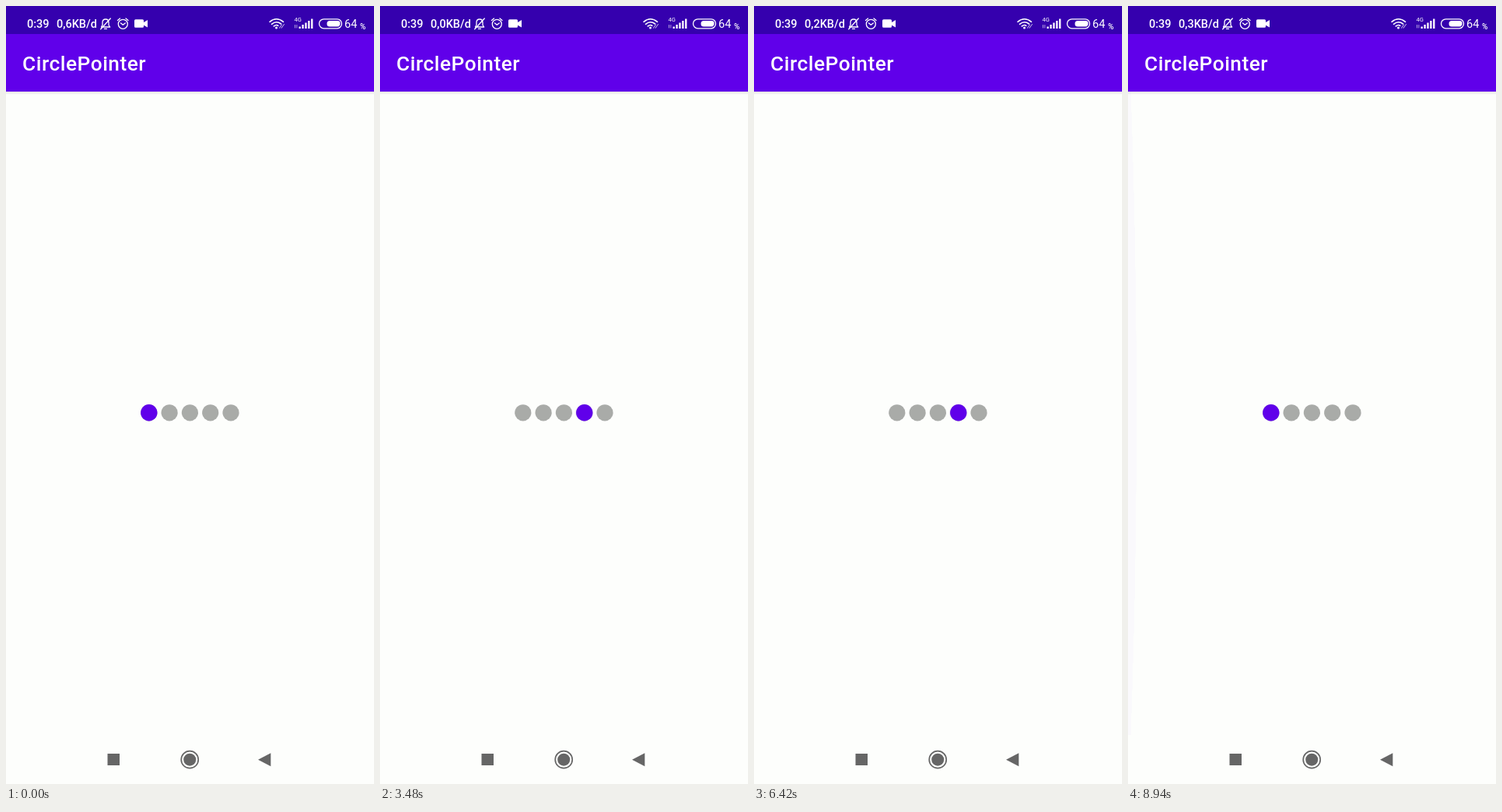
Animation, 473 px wide and 1000 px high, one loop 9 s. Source, as an HTML page:

```html
<!DOCTYPE html>
<html lang="en">
<head>
<meta charset="utf-8">
<title>Pager dots</title>
<style>
  html, body { margin: 0; width: 100%; height: 100%; overflow: hidden; background: #fdfefc; }
  svg { display: block; width: 100%; height: 100%; }
  text { font-family: Roboto, sans-serif; fill: #fff; }
  .status { font-size: 14.5px; font-weight: 500; }
  .title { font-size: 26.3px; font-weight: 500; letter-spacing: .5px; }
  .line { fill: none; stroke: #fff; stroke-width: 1.3; stroke-linecap: round; stroke-linejoin: round; }
  .bold { stroke-width: 1.6; }
  .thin { stroke-width: .8; }
  .fill { fill: #fff; }
  .nav { fill: #666; }

  .current { animation: page 9s step-end infinite; }
  @keyframes page {
    0% { transform: translateX(0); }
    11.1% { transform: translateX(26.3px); }
    21.7% { transform: translateX(52.6px); }
    32.3% { transform: translateX(78.9px); }
    43.3% { transform: translateX(105.2px); }
    65.5% { transform: translateX(78.9px); }
    73.3% { transform: translateX(52.6px); }
    80% { transform: translateX(26.3px); }
    87.2%, 100% { transform: translateX(0); }
  }

  .rate text { visibility: hidden; animation: 9s step-end infinite; }
  .rate :nth-child(1) { animation-name: rate1; }
  .rate :nth-child(2) { animation-name: rate2; }
  .rate :nth-child(3) { animation-name: rate3; }
  .rate :nth-child(4) { animation-name: rate4; }
  @keyframes rate1 { 0% { visibility: visible; } 11.1%, 100% { visibility: hidden; } }
  @keyframes rate2 { 0% { visibility: hidden; } 11.1% { visibility: visible; } 44.4%, 100% { visibility: hidden; } }
  @keyframes rate3 { 0% { visibility: hidden; } 44.4% { visibility: visible; } 77.8%, 100% { visibility: hidden; } }
  @keyframes rate4 { 0% { visibility: hidden; } 77.8%, 100% { visibility: visible; } }

  /* Overscroll glow: a wide circle squashed against the page edge */
  .glow { fill: #6200ee; opacity: 0; transform-box: view-box; }
  .right { transform-origin: 473px 523px; animation: pull-right 9s infinite; }
  .left { transform-origin: 0 523px; animation: pull-left 9s infinite; }
  @keyframes pull-right {
    0%, 54.3% { transform: scaleX(0); opacity: 0; animation-timing-function: ease-out; }
    56.6%, 57% { transform: scaleX(.42); opacity: .09; animation-timing-function: cubic-bezier(.333, .667, .667, 1); }
    63.7%, 100% { transform: scaleX(0); opacity: 0; }
  }
  @keyframes pull-left {
    0%, 93.5% { transform: scaleX(0); opacity: 0; animation-timing-function: ease-out; }
    96% { transform: scaleX(.42); opacity: .09; animation-timing-function: cubic-bezier(.333, .476, .667, .81); }
    100% { transform: scaleX(.067); opacity: .014; }
  }
</style>
</head>
<body>
<svg viewBox="0 0 473 1000" preserveAspectRatio="none">
  <defs>
    <clipPath id="content"><rect y="110" width="473" height="827"/></clipPath>
    <linearGradient id="shadow" x2="0" y2="1">
      <stop stop-opacity=".1"/>
      <stop offset="1" stop-opacity="0"/>
    </linearGradient>
  </defs>

  <rect width="473" height="1000" fill="#fdfefc"/>
  <g clip-path="url(#content)">
    <circle class="glow right" cx="1608" cy="523" r="1240"/>
    <circle class="glow left" cx="-1135" cy="523" r="1240"/>
  </g>

  <rect y="110" width="473" height="4" fill="url(#shadow)"/>
  <rect y="36" width="473" height="74" fill="#6000ea"/>
  <rect width="473" height="36" fill="#3500ae"/>
  <text class="title" x="21" y="83">CirclePointer</text>

  <g class="status">
    <text x="27" y="27.700">0:39</text>
    <g class="rate">
      <text x="65" y="27.700">0,6KB/d</text>
      <text x="65" y="27.700">0,0KB/d</text>
      <text x="65" y="27.700">0,2KB/d</text>
      <text x="65" y="27.700">0,3KB/d</text>
    </g>
    <text x="435" y="27.700" font-weight="400">64</text>
    <text x="455" y="30" font-size="10">%</text>
  </g>

  <!-- muted bell, alarm, camera -->
  <path class="line" d="M122.500 27H133.700L132 24.500V21.300C132 18.500 130.500 17 128 17S124 18.500 124 21.300V24.500ZM126.500 29.300H129.500M121.700 29.800L134.300 16"/>
  <g class="line">
    <circle cx="150.300" cy="23.300" r="6"/>
    <path d="M147.500 22L150.300 24.300L153.300 22M143.500 18.500L146.500 16M157 18.500L154 16"/>
  </g>
  <path class="fill" d="M166.500 17.300H175.500Q177 17.300 177 18.800V21L182 18V27.500L177 24.800V26.300Q177 27.800 175.500 27.800H166.500Q165 27.800 165 26.300V18.800Q165 17.300 166.500 17.300Z"/>

  <!-- wifi -->
  <path class="line bold" d="M339 20.300Q347.500 13.300 356.500 20.300M341.500 23.300Q347.500 18.300 353.500 23M344.300 26Q347.500 23.500 349.800 25.300"/>
  <path class="line thin" d="M351.500 28.300L354.500 24M354 28.300L357.500 23.500"/>
  <circle class="fill" cx="347.500" cy="28" r="1.500"/>

  <!-- mobile signal -->
  <text x="370.500" y="20" font-size="7.500">4G</text>
  <path class="line thin" d="M371.500 28V24.500M373.800 24.500V28" opacity=".8"/>
  <path class="fill" d="M376.500 26.500h2.300v2.500h-2.300zM380.400 24h2.300v5h-2.300zM384.300 21.500h2.300v7.500h-2.300zM388.200 19h2.300v10h-2.300zM392.100 16.500h2.300v12.500h-2.300z"/>

  <!-- battery -->
  <rect class="line" x="402.500" y="16.800" width="29" height="12" rx="6"/>
  <rect class="fill" x="412.500" y="19" width="17" height="7.600" rx="3.500"/>

  <g fill="#a9aba8">
    <circle cx="183.800" cy="522.800" r="10.600"/>
    <circle cx="210.100" cy="522.800" r="10.600"/>
    <circle cx="236.400" cy="522.800" r="10.600"/>
    <circle cx="262.700" cy="522.800" r="10.600"/>
    <circle cx="289" cy="522.800" r="10.600"/>
  </g>
  <circle class="current" cx="183.800" cy="522.800" r="10.700" fill="#6000ea"/>

  <rect class="nav" x="130.500" y="961" width="15.500" height="15"/>
  <circle class="nav" cx="236.200" cy="968.700" r="8"/>
  <circle cx="236.200" cy="968.700" r="11" fill="none" stroke="#666" stroke-width="1.700"/>
  <path class="nav" d="M324 968.700L340.300 960.300V977.200Z"/>
</svg>
</body>
</html>
```
